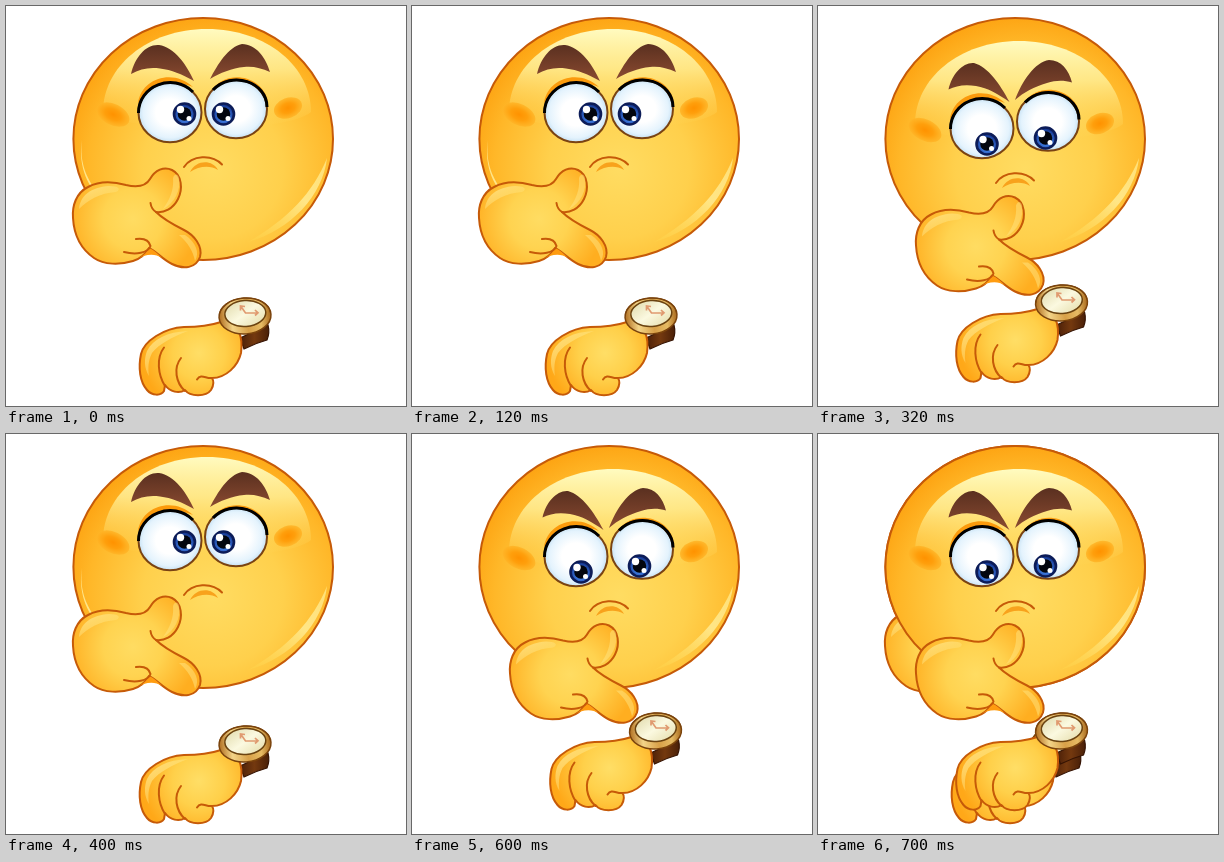
These frames come from a looping animation (400 by 400 pixels, 800 ms). An HTML page:

```html
<!DOCTYPE html>
<html lang="en">
<head>
<meta charset="utf-8">
<title>Checking the watch</title>
<style>
  html, body { margin: 0; width: 100%; height: 100%; overflow: hidden; background: #fff; }
  svg { display: block; width: 100vw; height: 100vh; }
  .up { animation: up 800ms step-end infinite; }
  .down { animation: down 800ms step-end infinite; }
  @keyframes up {
    0%, 50%, 87.5% { visibility: visible; }
    25%, 75% { visibility: hidden; }
  }
  @keyframes down {
    0%, 50% { visibility: hidden; }
    25%, 75% { visibility: visible; }
  }
  .line { fill: none; stroke: #c65a08; stroke-width: 2; stroke-linecap: round; stroke-linejoin: round; }
</style>
</head>
<body>
<svg viewBox="0 0 400 400">
  <defs>
    <radialGradient id="skin" gradientUnits="userSpaceOnUse" cx="207" cy="162" r="156">
      <stop offset="0" stop-color="#ffdc62"/>
      <stop offset=".45" stop-color="#ffd04c"/>
      <stop offset=".8" stop-color="#ffb728"/>
      <stop offset="1" stop-color="#fda210"/>
    </radialGradient>
    <linearGradient id="shine" x1="0" y1="0" x2="0" y2="1">
      <stop offset="0" stop-color="#fffbc0"/>
      <stop offset=".4" stop-color="#fff19a" stop-opacity=".8"/>
      <stop offset="1" stop-color="#ffdc60" stop-opacity="0"/>
    </linearGradient>
    <linearGradient id="rim" gradientUnits="userSpaceOnUse" x1="320" y1="155" x2="245" y2="236">
      <stop offset="0" stop-color="#ffe98a" stop-opacity=".8"/>
      <stop offset=".4" stop-color="#ffec94" stop-opacity=".85"/>
      <stop offset="1" stop-color="#ffd84c" stop-opacity=".3"/>
    </linearGradient>
    <radialGradient id="palm" gradientUnits="userSpaceOnUse" cx="127" cy="213" r="66">
      <stop offset="0" stop-color="#ffdc62"/>
      <stop offset=".45" stop-color="#ffd350"/>
      <stop offset="1" stop-color="#ffae20"/>
    </radialGradient>
    <radialGradient id="knuckle" gradientUnits="userSpaceOnUse" cx="193" cy="347" r="58">
      <stop offset="0" stop-color="#ffde66"/>
      <stop offset=".45" stop-color="#ffd04a"/>
      <stop offset="1" stop-color="#ffa818"/>
    </radialGradient>
    <linearGradient id="gleam" x1="0" y1="0" x2="1" y2="1">
      <stop offset="0" stop-color="#fff0a0" stop-opacity=".8"/>
      <stop offset="1" stop-color="#ffe27a" stop-opacity="0"/>
    </linearGradient>
    <radialGradient id="blush">
      <stop offset="0" stop-color="#ff9200"/>
      <stop offset=".5" stop-color="#ff9f0c"/>
      <stop offset="1" stop-color="#ffb426" stop-opacity=".85"/>
    </radialGradient>
    <radialGradient id="white">
      <stop offset=".45" stop-color="#fff"/>
      <stop offset=".85" stop-color="#e4f3fd"/>
      <stop offset="1" stop-color="#c8e2f4"/>
    </radialGradient>
    <radialGradient id="iris" cy=".6">
      <stop offset=".5" stop-color="#3d78dc"/>
      <stop offset="1" stop-color="#173a94"/>
    </radialGradient>
    <linearGradient id="hair" x1="0" y1="0" x2="0" y2="1">
      <stop offset="0" stop-color="#5a3020"/>
      <stop offset="1" stop-color="#8a4a30"/>
    </linearGradient>
    <linearGradient id="gold">
      <stop offset="0" stop-color="#b06e20"/>
      <stop offset=".25" stop-color="#f3d488"/>
      <stop offset=".55" stop-color="#d8a048"/>
      <stop offset=".8" stop-color="#e6bb64"/>
      <stop offset="1" stop-color="#a8681c"/>
    </linearGradient>
    <linearGradient id="dial" x1="0" y1="0" x2="1" y2="1">
      <stop offset="0" stop-color="#dfd8a8"/>
      <stop offset=".5" stop-color="#fbf9e0"/>
      <stop offset="1" stop-color="#e4dba8"/>
    </linearGradient>
    <linearGradient id="strap">
      <stop offset="0" stop-color="#4a1f08"/>
      <stop offset=".5" stop-color="#74390f"/>
      <stop offset="1" stop-color="#4a2008"/>
    </linearGradient>

    <g id="head">
      <ellipse cx="197.200" cy="133" rx="129.800" ry="121" fill="url(#skin)" stroke="#c65a08" stroke-width="2"/>
      <path d="M321 152C317 189 285 224 242 236C282 213 307 187 321 152Z" fill="url(#rim)"/>
    </g>

    <path id="gloss" d="M97 106C97 61 141 23 201 23C261 23 305 61 305 106C280 128 122 128 97 106Z" fill="url(#shine)"/>

    <g id="cheeks" fill="url(#blush)">
      <ellipse rx="17.500" ry="10.500" transform="translate(107 108.500) rotate(26)"/>
      <ellipse rx="14.500" ry="10" transform="translate(282 102) rotate(-20)"/>
    </g>

    <g id="mouth">
      <path class="line" d="M178 161C186 149 206 148 216 158.500"/>
      <path d="M184 166C190 154 206 153 212 164C204 159 193 160 184 166Z" fill="#f8a21c"/>
    </g>

    <g id="eyeL">
      <path d="M132 97C136 71 168 63 187 81C168 73 144 80 132 97Z" fill="#fb9a0c"/>
      <ellipse cx="164" cy="106.500" rx="31.500" ry="29.800" fill="url(#white)" stroke="#7a4312" stroke-width="2"/>
      <path d="M132.500 107C132 80 167 66 187 86" fill="none" stroke="#000" stroke-width="3"/>
    </g>
    <g id="eyeR">
      <path d="M208 82C221 64 257 69 262 96C250 77 225 72 208 82Z" fill="#fb9a0c"/>
      <ellipse cx="230" cy="103" rx="31" ry="29.200" fill="url(#white)" stroke="#7a4312" stroke-width="2"/>
      <path d="M207 84C226 64 261 76 261 101" fill="none" stroke="#000" stroke-width="3"/>
    </g>

    <g id="pupil">
      <circle r="10.500" fill="url(#iris)" stroke="#0c1c58" stroke-width="2.600"/>
      <circle r="6.800" fill="#03060f"/>
      <circle r="3.700" cx="-4" cy="-4.500" fill="#fff"/>
      <circle r="2.500" cx="4.500" cy="4.500" fill="#fff"/>
    </g>

    <g id="hand">
      <path class="line" style="fill:url(#palm)" d="M82 181C95 174 109 176 120 179C133 182 140 180 144 173C149 164 158 160 166 164C176 169 177 183 172 193C167 203 158 207 150 206C157 213 168 219 178 224C188 229 197 240 194 251C190 262 178 264 166 258C156 253 151 246 143 242C139 249 134 253 127 255C114 259 98 259 88 252C75 243 68 230 67 212C66 200 70 187 82 181Z"/>
      <path d="M129 254C136 251 141 247 143 242C148 244 152 248 156 252C148 247 140 248 129 254Z" fill="#ff9c10"/>
      <path class="line" d="M144.500 197C145 201 147 204 150 206M118 246C130 249 142 247 144.500 240C143 234 137 232 130 233"/>
      <path d="M73 203C74 190 85 181 103 180C112 180 116 183 110 186C94 187 82 194 73 203Z" fill="url(#gleam)"/>
      <path d="M173 172C175 184 169 197 157 203C164 193 168 184 167 172C169 167 172 168 173 172Z" fill="#ffe582" opacity=".5"/>
      <path d="M179 229C190 236 194 247 189 255C187 245 182 237 173 229Z" fill="#ffe582" opacity=".5"/>
    </g>

    <g id="fist">
      <path d="M234 332L262 319Q264 327 261 334Q250 337 238 343Z" fill="url(#strap)" stroke="#351303" stroke-width="1.200"/>
      <path class="line" style="fill:url(#knuckle)" d="M215 316C203 320 190 321 178 321C158 322 138 335 135 348C132 362 134 376 141 384C146 390 155 390 158 385L159 379C164 386 173 388 179 384C184 391 200 391 205 384C208 379 208 375 206 372C220 372 232 360 235 347C236 340 236 333 233 326Z"/>
      <path class="line" d="M158 341.500C150 352 152 369 159 380M175 352C167 362 170 377 179 385M191 373.500C195 367 200 373 206 372"/>
      <path d="M141 345C147 333 161 326 182 325C166 331 153 338 146 347C142 355 142 362 143 370C138 362 138 353 141 345Z" fill="url(#gleam)"/>
      <g transform="rotate(-4 239 310)">
        <ellipse cx="239" cy="310" rx="26" ry="18" fill="url(#gold)" stroke="#7a430c" stroke-width="1.500"/>
        <path d="M213.500 308A25.500 16 0 0 1 264.500 308" fill="none" stroke="#7a430c" stroke-width="1"/>
        <ellipse cx="239.500" cy="307.500" rx="20.500" ry="13" fill="url(#dial)" stroke="#6b4310" stroke-width="1.500"/>
      </g>
      <path d="M235 300.500L239.500 307L252 306.800M234.500 304.500L234.500 300L239 300.500M249 304L252 306.800L249 309.500" fill="none" stroke="#e09a70" stroke-width="1.700"/>
    </g>
  </defs>

  <g class="up">
    <use href="#head"/>
    <use href="#gloss"/>
    <path d="M76 134C73 157 81 174 94 190C80 180 72 156 76 134Z" fill="#fff0a0" opacity=".8"/>
    <use href="#cheeks"/>
    <use href="#eyeL"/>
    <use href="#eyeR"/>
    <use href="#pupil" x="178.500" y="108"/>
    <use href="#pupil" x="217.500" y="108"/>
    <g fill="url(#hair)">
      <path d="M125 68C129 51 140 38 153 39C168 41 181 59 188 75C175 68 166 64 154 62.500C143 61 134 63 125 68Z"/>
      <path d="M204 73C212 58 222 41 236 38C250 38 260 52 264 66C255 62 247 60 238 61C226 62 214 67 204 73Z"/>
    </g>
    <use href="#mouth"/>
    <use href="#hand"/>
    <use href="#fist"/>
  </g>

  <g class="down">
    <use href="#head"/>
    <use href="#gloss" y="12"/>
    <use href="#cheeks" y="15.500"/>
    <use href="#eyeL" y="16"/>
    <use href="#eyeR" y="12.500"/>
    <use href="#pupil" x="169" y="138"/>
    <use href="#pupil" x="227.500" y="132"/>
    <g fill="url(#hair)">
      <path d="M130.500 83.500C134 68 145 56 156 57C170 61 182 78 191.500 96C180 88 170 82 158 80C146 78 138 80 130.500 83.500Z"/>
      <path d="M197 94C204 75 217 56 231 54C243 54 251 64 254 76.500C246 74 238 74 229 77C216 81 206 86 197 94Z"/>
    </g>
    <use href="#mouth" y="16"/>
    <use href="#hand" x="31" y="27.500"/>
    <use href="#fist" x="4.500" y="-13"/>
  </g>
</svg>
</body>
</html>
```
